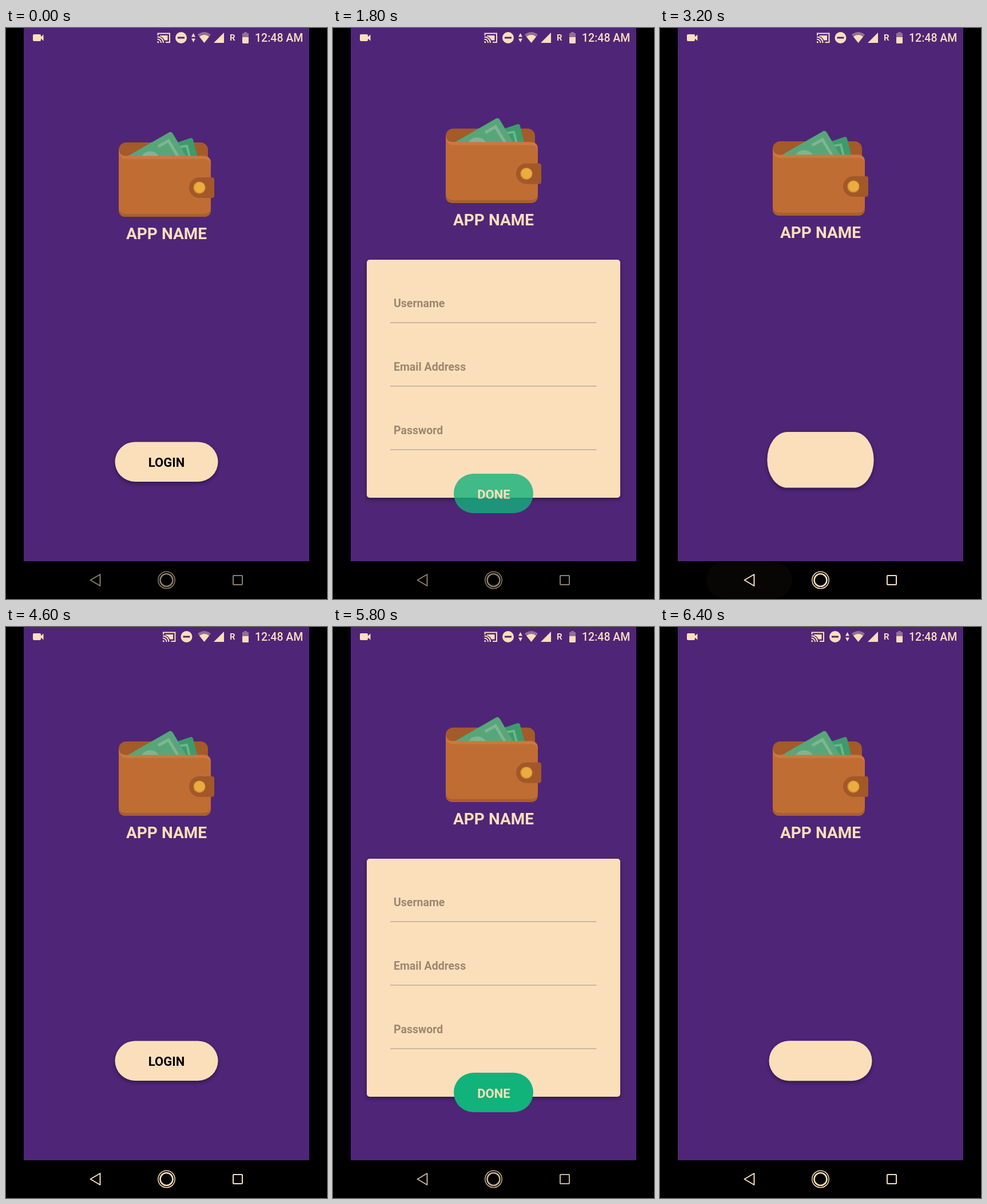
An HTML page for the animation above (6.5 s loop, 561 px wide and 998 px high).

```html
<!DOCTYPE html>
<html lang="en">
<head>
<meta charset="utf-8">
<title>Login card transition</title>
<style>
  html, body { margin: 0; width: 100%; height: 100%; overflow: hidden; background: #000; }
  svg { display: block; width: 100vw; height: 100vh; }
  text { font-family: Roboto, sans-serif; font-weight: 700; }
  .cream { fill: #fbdfbb; }
  .line { fill: none; stroke: #fbdfbb; }
  #card { filter: drop-shadow(0 3px 3px rgba(0, 0, 0, .38)); }
  #fields text { font-size: 19.5px; fill: #9c8770; }
  #fields path { stroke: #bfab92; stroke-width: 1.5; }
</style>
</head>
<body>
<svg viewBox="0 0 561 998">
  <rect width="561" height="998"/>
  <rect x="31" width="499" height="932" fill="#4f2577"/>

  <g id="status" class="cream">
    <path d="M49 11H59Q61 11 61 13V15.5L65.500 11.500V22.500L61 18.500V21Q61 23 59 23H49Q47 23 47 21V13Q47 11 49 11Z"/>
    <g id="leftIcons">
      <path class="line" stroke-width="2" d="M265.500 13V9.500H286V25H279"/>
      <path class="line" stroke-width="2" d="M264.500 15.500A10.500 10.500 0 0 1 275 26M264.500 19.500A6.500 6.500 0 0 1 271 26"/>
      <path d="M264.500 23A3 3 0 0 1 267.500 26H264.500ZM269 13H282.500V21.500H277Q274 15.500 269 14.500Z"/>
      <circle cx="306" cy="17" r="10"/>
      <rect x="300" y="15.500" width="12" height="3" fill="#4f2577"/>
    </g>
    <path id="arrows" d="M324 15.500L327.500 9L331 15.500ZM324 18.500H331L327.500 25Z"/>
    <path opacity=".4" d="M346.500 26L335 11.500Q346.500 2.500 358 11.500Z"/>
    <path d="M346.500 26L338 15.300Q346.500 8.500 355 15.300Z"/>
    <path d="M363 26H381V8Z"/>
    <text x="391" y="22" font-size="15">R</text>
    <path opacity=".4" d="M416 7H421V9H424V17H413V9H416Z"/>
    <path d="M413 16H424V25.500Q424 27 422.500 27H414.500Q413 27 413 25.500Z"/>
    <text x="435" y="24" font-size="19.500" style="font-weight:500">12:48 AM</text>
  </g>

  <g id="brand">
    <rect x="197" y="200" width="156" height="60" rx="13" fill="#a45a29"/>
    <path fill="#3d9b6b" d="M288 204L322 192.500Q326 191.500 327 195.500L335 226H280Z"/>
    <path fill="none" stroke="#6eb48d" stroke-width="4" d="M303 208L316 206L321 226"/>
    <path fill="#57a67a" d="M211 225L284 183Q288.500 180 291.500 184.500L316 226Z"/>
    <circle cx="252" cy="233" r="17.500" fill="#80b591"/>
    <path fill="none" stroke="#80b591" stroke-width="5" d="M266 207L284 197L302 227"/>
    <path fill="#cb7841" d="M197 211Q198 223.500 209 223.500H346Q358 224 358 236V317Q358 330 345 330H210Q197 330 197 317Z"/>
    <path fill="#a95f2b" d="M197 290V317Q197 330 210 330H345Q358 330 358 317V290Z"/>
    <path fill="#c06d34" d="M197 214Q198 229 210 229H346Q357 229 358 240V312Q358 325 345 325H210Q197 325 197 312Z"/>
    <path fill="#a25828" d="M338 261H360Q364 261 364 265V293Q364 297 360 297H338A18 18 0 0 1 338 261Z"/>
    <circle cx="338" cy="279" r="10.500" fill="#dc9836"/>
    <circle cx="338.500" cy="278.500" r="8.800" fill="#ebad40"/>
    <text class="cream" x="280.500" y="369" font-size="28" text-anchor="middle">APP NAME</text>
  </g>

  <rect id="card" class="cream"/>
  <text id="label" x="280.500" y="767" font-size="22" text-anchor="middle">LOGIN</text>

  <g id="form">
    <g id="fields"></g>
    <g id="done">
      <rect x="211" y="779" width="139" height="69" rx="34.500" fill="#12b27b"/>
      <text class="cream" x="281" y="823" font-size="22" text-anchor="middle">DONE</text>
    </g>
  </g>

  <rect id="ripple" x="81" y="933" width="150" height="64" rx="32" fill="#080604"/>
  <g id="nav" class="line" stroke-width="2">
    <path d="M147.500 965L164.500 955V975Z" stroke-linejoin="round"/>
    <circle cx="280.500" cy="965" r="14.700" stroke-width="1.500"/>
    <circle cx="280.500" cy="965" r="11" stroke-width="2.600"/>
    <rect x="397" y="957" width="16" height="16" rx="1"/>
  </g>
</svg>
<script>
const LOOP = 6500, STEP = 100, FLIGHT = 400;
const $ = id => document.getElementById(id);
const button = { w: 180, h: 69.5, cy: 758.2, r: 35 };
const panel = { w: 443, h: 416, cy: 613, r: 5 };

// [start time, openness reached by the flight]
const flights = [[193, 1], [2893, 0], [4993, 1], [6020, 0]];

// [time, value] steps, linear in between
const tracks = {
  label: [[190, 1], [300, 0], [3450, 0], [3650, 1], [4990, 1], [5100, 0]],
  form: [[700, 0], [900, 1], [2890, 1], [3040, 0], [5500, 0], [5700, 1], [6020, 1], [6170, 0]],
  done: [[1700, 1], [1800, .8], [1900, .8], [2100, 1]],
  nav: [[2700, .56], [2900, 1], [5400, 1], [5800, .8], [6000, 1]],
  ripple: [[2750, 0], [2900, 1], [3300, 1], [3600, 0], [5900, 0], [6000, 1], [6200, 1], [6400, 0]]
};

["Username", "Email Address", "Password"].forEach((name, i) => {
  const y = 488 + 111 * i;
  $("fields").innerHTML += `<text x="106" y="${y}">${name}</text><path d="M100 ${y + 27}H460.500"/>`;
});

const lerp = (a, b, k) => a + (b - a) * k;
const easeInOut = k => k < .5 ? 8 * k ** 4 : 1 - 8 * (1 - k) ** 4;

function sample(track, t) {
  const next = track.findIndex(([time]) => time > t);
  if (next === 0) return track[0][1];
  if (next < 0) return track[track.length - 1][1];
  const [t0, a] = track[next - 1], [t1, b] = track[next];
  return lerp(a, b, (t - t0) / (t1 - t0));
}

function openness(t) {
  const flight = flights.filter(([start]) => start <= t).pop();
  if (!flight) return 0;
  const k = easeInOut(Math.min(1, (t - flight[0]) / FLIGHT));
  return flight[1] ? k : 1 - k;
}

function placeCard(open) {
  const w = lerp(button.w, panel.w, open);
  const h = lerp(button.h, panel.h, open ** .67);
  const settled = open === 1;
  const cy = lerp(button.cy, panel.cy, settled ? 1 : open * .985);
  // in flight the corners stretch along with the button
  const r = lerp(button.r, 3, open);
  const box = {
    x: 280.5 - w / 2, y: cy - h / 2, width: w, height: h,
    rx: settled ? panel.r : r * w / button.w,
    ry: settled ? panel.r : r * h / button.h
  };
  for (const key in box) $("card").setAttribute(key, box[key]);
}

function draw(now) {
  const t = Math.floor(now % LOOP / STEP) * STEP;
  const open = openness(t);
  placeCard(open);
  $("brand").setAttribute("transform", `translate(0 ${-24.3 * open ** .67})`);
  for (const id in tracks) $(id).setAttribute("opacity", sample(tracks[id], t));
  const quiet = t >= 2600 && t < 4900;
  $("arrows").setAttribute("opacity", quiet ? 0 : 1);
  $("leftIcons").setAttribute("transform", `translate(${quiet ? 9.5 : 0} 0)`);
}

const begin = performance.now();
function tick() {
  draw(performance.now() - begin);
  requestAnimationFrame(tick);
}
tick();
</script>
</body>
</html>
```
